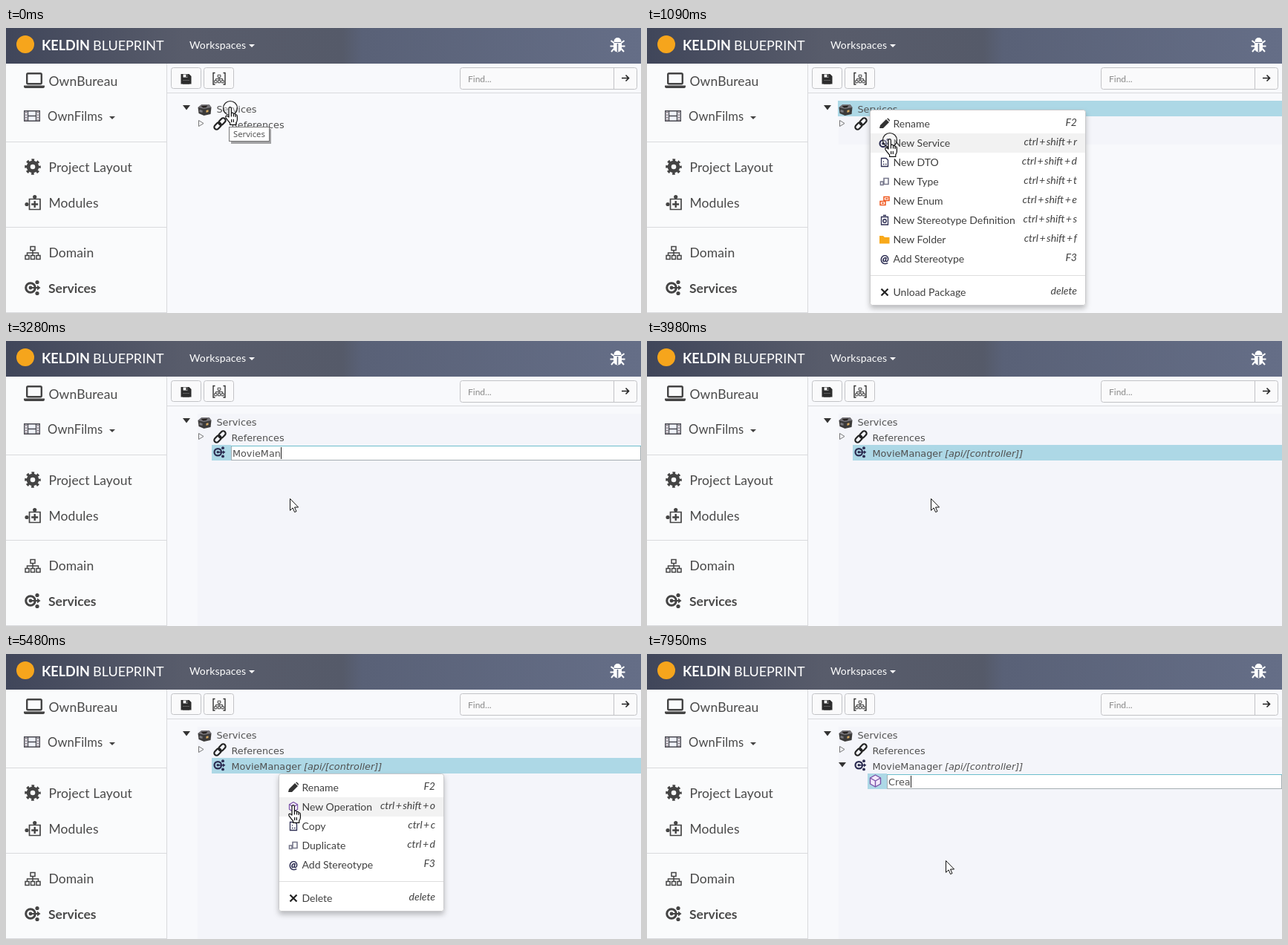
Recreate the animation shown at these times as an HTML page. Size 855 by 384 pixels, loop 8 s.

```html
<!DOCTYPE html>
<html lang="en">
<head>
<meta charset="utf-8">
<title>Service designer</title>
<style>
html, body { margin: 0; width: 100%; height: 100%; overflow: hidden; background: #f8f9fc; }
svg { display: block; width: 855px; height: 384px; }
text { font-family: Lato, sans-serif; white-space: pre; }
.side { font-size: 17.5px; fill: #4a4a4a; letter-spacing: .1px; }
.tree { font: 12.8px "DejaVu Sans", sans-serif; fill: #505050; }
.menu { font-size: 14px; fill: #404040; }
.key { font-style: italic; text-anchor: end; word-spacing: -1.8px; }
.picked { fill: #fff; stroke: #fff; stroke-width: .35px; }
.tip { font: 11.3px "Open Sans", sans-serif; fill: #4a4a4a; }
</style>
</head>
<body>
<svg viewBox="0 0 855 384" xmlns="http://www.w3.org/2000/svg">
  <defs>
    <linearGradient id="bar">
      <stop offset="0" stop-color="#40465a"/>
      <stop offset=".28" stop-color="#585c6b"/>
      <stop offset=".53" stop-color="#555a69"/>
      <stop offset=".56" stop-color="#596177"/>
      <stop offset="1" stop-color="#656e87"/>
    </linearGradient>
    <filter id="shade" x="-10%" y="-10%" width="120%" height="125%">
      <feDropShadow dx="0" dy="4" stdDeviation="3.5" flood-opacity=".25"/>
    </filter>
    <g id="service" fill="none" stroke="currentColor">
      <circle cx="-3" cy="1" r="6.3" stroke-width="3"/>
      <circle cx="-3" cy="1" r="2.4" fill="currentColor" stroke="none"/>
      <path d="M-2 1H8" stroke-width="2"/>
      <path d="M6-2.5 10.5 1 6 4.5Z" fill="currentColor" stroke="none"/>
      <circle cx="6" cy="-6.5" r="2.6" fill="currentColor" stroke="none"/>
      <circle cx="6" cy="8.5" r="2.6" fill="currentColor" stroke="none"/>
    </g>
    <g id="sitemap" fill="none" stroke="currentColor" stroke-width="1.5">
      <path d="M-3-8.5H3V-3.5H-3ZM-10 3.5H-5V8.5H-10ZM-2.5 3.5H2.5V8.5H-2.5ZM5 3.5H10V8.5H5ZM0-3.5V3.5M-7.5 3.5V0H7.5V3.5"/>
    </g>
    <g id="cube" fill="#f3e9fb" stroke="#7a52a8" stroke-width="1.4" stroke-linejoin="round">
      <path d="M0-8 7-4V4L0 8-7 4V-4Z"/><path d="M-7-4 0 0 7-4M0 0V8" fill="none"/>
    </g>
    <g id="link" fill="none" stroke="#222" stroke-width="2.2" transform="rotate(-45)">
      <rect x="-9.5" y="-3.2" width="10.5" height="6.4" rx="3.2"/>
      <rect x="-1" y="-3.2" width="10.5" height="6.4" rx="3.2"/>
    </g>
    <g id="box">
      <path d="M-9-3-4-7H6L9-3 8 6-1 8-8 5Z" fill="#3b3a3a"/>
      <path d="M-9-3-1-1 9-3 6-7-4-7Z" fill="#77757a"/>
      <path d="M-5-5 4-5.5 2-3-2-2.5Z" fill="#24201e"/>
      <path d="M2 1 5 .3V3L2 4Z" fill="#d9ab62"/><path d="M-7 0-3 1V4L-7 3Z" fill="#7c7b80"/>
    </g>
    <path id="arrow" d="M.5.5V16.3L4.1 12.9 6.6 18.6 9 17.5 6.5 12H11.6Z" fill="#fff" stroke="#111"/>
    <g id="hand" stroke="#111" stroke-width="1.2" stroke-linejoin="round">
      <path d="M5 14V2.5Q5 .7 6.7.7T8.4 2.5V9Q9.2 7.9 10.4 8.2 11.4 8.5 11.5 9.6 13.6 8.9 14.1 10.8 16.4 10.4 16.4 12.8V17.5Q16.2 20 14.8 21.5V24.4H6.6V22Q4 19.2 1 14.8.2 13.1 1.5 12.4 3 12 5 14Z" fill="#fff"/>
      <path d="M8.4 9V13.5M11.5 9.6V13.5M14.1 11V14M8.6 17V21M11.3 17V21" fill="none"/>
    </g>
  </defs>

  <rect width="855" height="384" fill="#f8f9fc"/>
  <rect y="48" width="216" height="336" fill="#fafbfc"/>
  <path d="M216.5 48V384M0 153.5H216M0 268.5H216M0 383.5H216M217 87.5H855" stroke="#d9dadd"/>
  <rect width="855" height="48" fill="url(#bar)"/>

  <circle cx="26" cy="22" r="12" fill="#f6a51c"/>
  <text x="48" y="30" font-size="18" font-weight="700" fill="#fff">KELDIN</text>
  <text x="117" y="30" font-size="18" fill="#fff">BLUEPRINT</text>
  <text x="247" y="28" font-size="14" fill="#fff" letter-spacing=".15">Workspaces</text>
  <path d="M327 22H335L331 26Z" fill="#fff"/>
  <g transform="translate(823.5 23)" stroke="#fff" stroke-width="2" fill="none">
    <path d="M-9-6-5-3M9-6 5-3M-10 1.5H10M-8.5 9-5 5M8.5 9 5 5"/>
    <path d="M-4-5A4 4 0 0 1 4-5Z" fill="#fff"/>
    <path d="M-5.5-3H5.5V4Q5 9 0 9.5-5 9-5.5 4Z" fill="#fff" stroke="none"/>
    <path d="M0-2V9" stroke="#626b83" stroke-width="1.6"/>
  </g>

  <g class="side">
    <text x="57.5" y="78">OwnBureau</text>
    <text x="56" y="125" style="font-size:16.6px">OwnFilms</text>
    <text x="57.5" y="194">Project Layout</text>
    <text x="57.5" y="242">Modules</text>
    <text x="57.5" y="309">Domain</text>
    <text x="57" y="357" font-weight="700" style="letter-spacing:0">Services</text>
  </g>
  <g fill="#444" color="#444">
    <path d="M139 119H147L143 123Z"/>
    <rect x="28.2" y="61.2" width="19.6" height="14" rx="1.5" fill="none" stroke="#444" stroke-width="2.4"/>
    <path d="M24 77.5H52V79Q52 81 49 81H27Q24 81 24 79Z"/>
    <path d="M24.7 111.7H45.3V125.3H24.7ZM29.5 111V126M40.5 111V126M29.5 118.5H40.5" fill="#eef1f8" stroke="#4a4a52" stroke-width="1.4"/>
    <path d="M27 113V125M43 113V125" stroke="#8d7f86" stroke-width="2.4" stroke-dasharray="1.6 1.8"/>
    <circle cx="36" cy="187" r="5.8" fill="none" stroke="#444" stroke-width="5"/>
    <circle cx="36" cy="187" r="9" fill="none" stroke="#444" stroke-width="3.6" stroke-dasharray="3.53 3.54" stroke-dashoffset="1.77"/>
    <path d="M31.5 230.5H46V244.5H31.5Z" fill="none" stroke="#444" stroke-width="1.7"/>
    <path d="M38.7 233V242M34.2 237.5H43.2" stroke="#444" stroke-width="2.4"/>
    <circle cx="38.7" cy="227.5" r="2.6"/>
    <circle cx="28" cy="237.5" r="2.6"/>
    <use href="#sitemap" x="36" y="303"/>
    <use href="#service" x="36" y="349"/>
  </g>

  <g fill="#fafafb" stroke="#c2c3c6">
    <rect x="222.5" y="53.5" width="40" height="28" rx="3"/>
    <rect x="266.5" y="53.5" width="40" height="28" rx="3"/>
    <rect x="611.5" y="53.5" width="238" height="29" rx="3"/>
    <path d="M818.5 53.5V82.5"/>
  </g>
  <path d="M235.5 62H246.5L249.5 65V75.5H235.5Z" fill="#2c2c2c"/>
  <path d="M238.500 62.500H244.500V66.500H238.500ZM238 70.500H247V75H238Z" fill="#f4f4f4"/>
  <path d="M242.500 62.500H244.500V66H242.500ZM238 70.500H247V75.500H238Z" fill="#2c2c2c"/>
  <path d="M281.500 60.500H279V76H281.500M292.500 60.500H295V76H292.500" fill="none" stroke="#333" stroke-width="1.4"/>
  <g color="#333" transform="translate(287 68.500) scale(.62)"><use href="#sitemap"/></g>
  <text x="622" y="73" font-size="12" fill="#8a8a8a">Find...</text>
  <path d="M829 67.500H838M834.500 63.500 838.500 67.500 834.500 71.500" fill="none" stroke="#222" stroke-width="1.6"/>

  <g id="scene"></g>
</svg>

<script>
const LOOP = 8000;
const BLUE = "#add8e6", NAVY = "#2c2d52";

// [time, value]: each value holds until the next entry
const phases = [[0, "rest"], [130, "picked"], [250, "menu"], [1210, "naming"],
  [3980, "named"], [5210, "menu2"], [5780, "operation"]];
const firstName = [[0, ""], [2180, "M"], [2320, "Mo"], [2440, "Mov"], [2560, "Movi"], [2720, "Movie"],
  [3000, "MovieM"], [3280, "MovieMan"], [3400, "MovieMana"], [3680, "MovieManag"], [3830, "MovieManager"]];
const secondName = [[0, ""], [7270, "C"], [7420, "Cr"], [7700, "Cre"], [7950, "Crea"]];
const hovered = [[0, -1], [550, 0], [820, 1], [1210, -1], [5360, 0], [5480, 1]];
const pointer = [
  [0, ["hand", 295, 106]], [550, ["hand", 302, 121]], [670, ["hand", 310, 134]],
  [820, ["hand", 316, 145]], [970, ["hand", 320, 149]], [1330, ["arrow", 382, 212]],
  [4820, ["arrow", 370, 167]], [4940, ["hand", 365, 161]], [5060, ["hand", 362, 157]],
  [5360, ["hand", 372, 178]], [5480, ["hand", 380, 203]], [5630, ["hand", 384, 204]],
  [5900, ["arrow", 402, 278]]];
const clicked = [[0, true], [130, false], [1090, true], [1210, false],
  [5060, true], [5210, false], [5630, true], [5780, false]];

const serviceMenu = [
  ["pencil", "Rename", "F2"], ["service", "New Service", "ctrl + shift + r"],
  ["dto", "New DTO", "ctrl + shift + d"], ["type", "New Type", "ctrl + shift + t"],
  ["enum", "New Enum", "ctrl + shift + e"], ["badge", "New Stereotype Definition", "ctrl + shift + s"],
  ["folder", "New Folder", "ctrl + shift + f"], ["at", "Add Stereotype", "F3"],
  ["cross", "Unload Package", "delete"]];
const operationMenu = [
  ["pencil", "Rename", "F2"], ["cube", "New Operation", "ctrl + shift + o"],
  ["dto", "Copy", "ctrl + c"], ["type", "Duplicate", "ctrl + d"],
  ["at", "Add Stereotype", "F3"], ["cross", "Delete", "delete"]];

const line = (d, color, width = 1.3) => `<path d="${d}" fill="none" stroke="${color}" stroke-width="${width}"/>`;
const shape = (d, color) => `<path d="${d}" fill="${color}"/>`;
const rect = (x, y, w, h, fill, more = "") =>
  `<rect x="${x}" y="${y}" width="${w}" height="${h}" fill="${fill}" ${more}/>`;
const text = (x, y, kind, words) => `<text x="${x}" y="${y}" class="${kind}">${words}</text>`;
const place = (x, y, body, scale = 1) =>
  `<g transform="translate(${x} ${y}) scale(${scale})" color="${NAVY}">${body}</g>`;
const use = id => `<use href="#${id}"/>`;

const icons = {
  pencil: shape("M-7 6-6 2 2-6 6-2-2 6ZM3-7 4.5-7.5 7-5 6.5-3Z", "#333"),
  service: place(0, 0, use("service"), .7),
  cube: place(0, 0, use("cube"), .8),
  dto: line("M-4.5-5.5H2L4.5-3V5.5H-4.5Z", NAVY) + line("M-2 2.5H-.5M1 2.5H2.5M-2-1H-1", NAVY),
  type: line("M-1-4.5H5V3.5H-1Z", "#77788c", 1.6) + line("M-5.5 0H-2V4.5H-5.5Z", "#77788c", 1.6),
  enum: line("M-1-5.5H6V-.5H-1ZM-6 .5H1V5.5H-6ZM1-3H4.5M-4 3H-1", "#f0571e", 1.5),
  badge: line("M-4.5-4.5H4.5V6H-4.5ZM-2-6.5H2", NAVY) + `<circle cy="1" r="2.2" fill="none" stroke="${NAVY}" stroke-width="1.4"/>`,
  folder: shape("M-7-5H-2L0-3H6.5V5.5H-7Z", "#f8a91b"),
  at: `<text y="5" text-anchor="middle" font-size="14" font-weight="900" fill="${NAVY}">@</text>`,
  cross: line("M-4.5-4.5 4.5 4.5M4.5-4.5-4.5 4.5", "#222", 2.2)
};

function menu(x, y, right, items, hover) {
  const last = items.length - 1;
  const rule = y + 5 + last * 26 + 9.5;
  let out = rect(x - .5, y - .5, right - x + 1, items.length * 26 + 29, "#fff",
    'rx="3" stroke="#c9c9cb" filter="url(#shade)"');
  items.forEach(([icon, label, key], i) => {
    const top = y + 5 + i * 26 + (i === last ? 19 : 0);
    if (i === hover) out += rect(x, top, right - x, 26, "#f2f2f2");
    out += place(x + 19, top + 13, icons[icon]) + text(x + 30.5, top + 18, "menu", label)
      + text(right - 11, top + 16, "menu key", key);
  });
  return out + line(`M${x} ${rule}H${right}`, "#dedede", 1);
}

const probe = document.createElement("canvas").getContext("2d");
function editor(x, y, typed, initial) {
  const words = typed || initial;
  probe.font = '12.8px "DejaVu Sans", sans-serif';
  const width = probe.measureText(words).width;
  const end = Math.round(x + 2 + width) + .5;
  let out = rect(x - 26, y, 26, 21, BLUE) + rect(x + .5, y + 1.5, 854 - x, 19, "#fff", 'stroke="#a5adb2"')
    + line(`M${x} ${y + 1.5}H855`, "#6cbdcc", 1);
  out += typed ? line(`M${end} ${y + 3}V${y + 19}`, "#222", 1) : rect(x + 2, y + 3, width, 16, "#3390ff");
  return out + text(x + 2, y + 16, typed ? "tree" : "tree picked", words);
}

const at = (table, t) => table.reduce((value, [time, next]) => time <= t ? next : value, table[0][1]);

function cursor(t) {
  const [kind, x, y] = at(pointer, t);
  const ring = `<circle cx="${x + 7}" cy="${y + 2}" r="9.5" fill="#fff" fill-opacity=".35" stroke="#222" stroke-width="1.2"/>`;
  return (at(clicked, t) ? ring : "") + place(x, y, use(kind));
}

function draw(t) {
  const phase = at(phases, t), hover = at(hovered, t);
  const early = ["rest", "picked", "menu"].includes(phase);
  let out = "";
  if (phase !== "rest") out += rect(258, 98, 597, early ? 59 : 286, "#f4f5fa");
  if (phase === "picked" || phase === "menu") out += rect(257, 98, 598, 21, BLUE);
  if (phase === "named" || phase === "menu2") out += rect(277, 140, 578, 21, BLUE);
  if (phase === "naming") out += editor(303, 140, at(firstName, t), "NewService");
  if (phase === "operation") out += editor(323, 161, at(secondName, t), "Operation") + place(307.5, 171, use("cube"));

  out += shape("M238 104H248L243 110.5Z", "#333") + place(267.5, 110, use("box"))
    + text(283.5, 114, "tree", "Services")
    + line("M259.5 124.5V132.5L266 128.5Z", "#777", 1) + place(288, 129, use("link"))
    + text(303.5, 135, "tree", "References");
  if (!early) out += place(287.5, 149, use("service"), .75);
  if (!early && phase !== "naming") {
    out += text(303.5, 156, "tree", "MovieManager")
      + text(401, 156, "tree", '<tspan font-style="italic">[api/[controller]]</tspan>');
  }
  if (phase === "operation") out += shape("M258 146H268L263 152.5Z", "#333");

  if (phase === "rest") {
    out += rect(303, 136, 54, 20, "#000", 'opacity=".35"')
      + rect(300.5, 133.5, 54, 19, "#fff", 'stroke="#777"') + text(306, 147, "tip", "Services");
  }
  if (phase === "menu") out += menu(301, 111, 590, serviceMenu, hover);
  if (phase === "menu2") out += menu(368, 162, 589, operationMenu, hover);
  return out + cursor(t);
}

const scene = document.getElementById("scene");
const start = performance.now();
let shown = "";
function tick() {
  const next = draw((performance.now() - start) % LOOP);
  if (next !== shown) scene.innerHTML = shown = next;
  requestAnimationFrame(tick);
}
tick();
</script>
</body>
</html>
```
